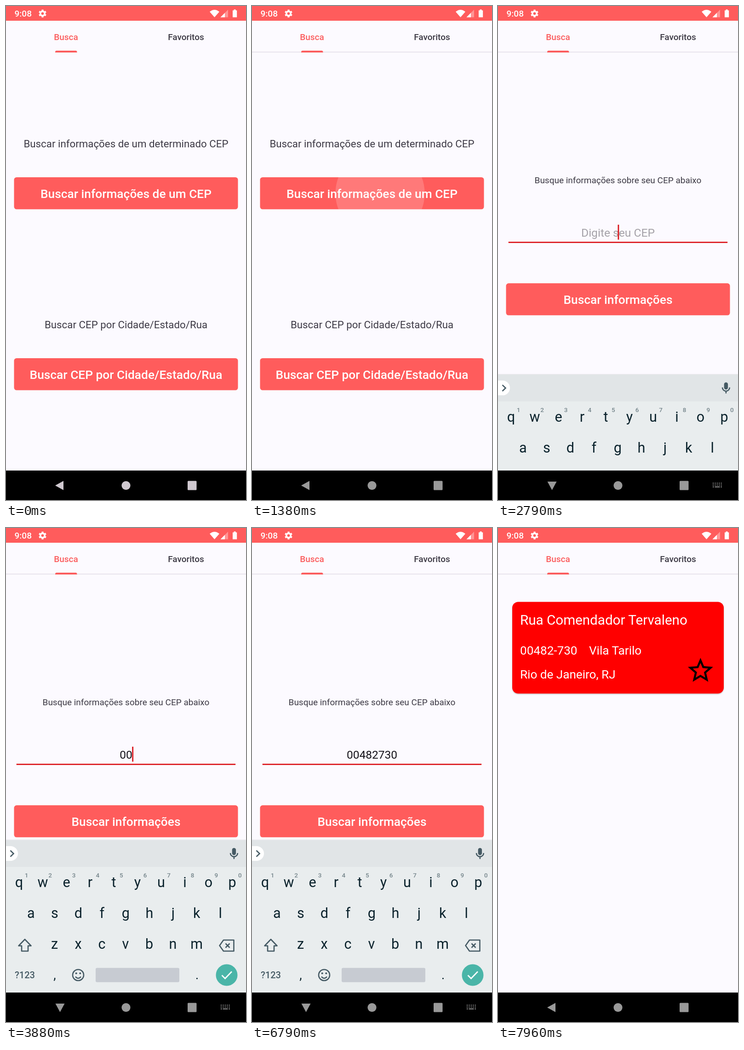
An HTML page for the animation above (8 s loop, 522 by 1073 pixels).

```html
<!DOCTYPE html>
<html lang="pt-BR">
<head>
<meta charset="utf-8">
<title>Busca de CEP</title>
<style>
  html, body { margin: 0; width: 100%; height: 100%; overflow: hidden; background: #fcfaff; }
  svg { display: block; width: 100vw; height: 100vh; font-family: Roboto, sans-serif; fill: #3d3a45; }
  .mid { text-anchor: middle; }
  .bold { font-weight: 500; }
  .line { fill: none; stroke: #455a64; stroke-width: 2.6; }
</style>
</head>
<body>
<svg id="stage" viewBox="0 0 522 1073">
  <defs>
    <clipPath id="content"><rect y="101" width="522" height="908"/></clipPath>
    <clipPath id="above"><rect width="522" height="1009"/></clipPath>
    <clipPath id="homeButton"><rect x="17.5" y="372" width="487" height="69.5" rx="5.5"/></clipPath>
    <clipPath id="formButton"><rect x="17.5" y="602.3" width="487" height="69.5" rx="5.5"/></clipPath>
    <filter id="shadow" x="-5%" y="-5%" width="110%" height="115%">
      <feDropShadow dx="0" dy="1.2" stdDeviation="1.3" flood-opacity=".3"/>
    </filter>
  </defs>

  <rect width="522" height="1073" fill="#fcfaff"/>
  <rect id="rule" y="99.3" width="522" height="1.5" fill="#e3dde6"/>
  <g class="mid bold" font-size="19">
    <text x="130.5" y="74.3" fill="#fb5d5e">Busca</text>
    <text x="391.5" y="74.3">Favoritos</text>
  </g>
  <path d="M107 101v-1q0-3 3-3h41.500q3 0 3 3v1z" fill="#fb5d5e"/>

  <g fill="#fff">
    <rect width="522" height="32" fill="#ff5c5c"/>
    <text x="18.500" y="23.300" font-size="19" class="bold">9:08</text>
    <g fill="none" stroke="#fff">
      <circle cx="79.500" cy="16.300" r="4.700" stroke-width="3.600"/>
      <circle cx="79.500" cy="16.300" r="7" stroke-width="3" pathLength="6" stroke-dasharray=".52 .48" stroke-dashoffset=".26" transform="rotate(30 79.500 16.300)"/>
    </g>
    <path d="M443 12.500Q453.500 4 464 12.500L453.500 24.500z"/>
    <path d="M466.500 24.500L483 8v16.500z" opacity=".35"/>
    <path d="M466.500 24.500L476 15v9.500z"/>
    <path d="M493 9.500h2.600v-2h4v2h2.600v15h-9.200z"/>
  </g>

  <g clip-path="url(#content)">
    <g id="home"></g>
    <g id="form"></g>
    <g id="result">
      <rect y="101" width="522" height="908" fill="#fcfaff"/>
      <rect x="31" y="160.500" width="460" height="199" rx="13" fill="#f00" filter="url(#shadow)"/>
      <g fill="#fff" font-size="26.100">
        <text x="48" y="209.500" font-size="29.600">Rua Comendador Tervaleno</text>
        <text x="48" y="275">00482-730</text>
        <text x="198" y="275">Vila Tarilo</text>
        <text x="48" y="327">Rio de Janeiro, RJ</text>
      </g>
      <path transform="translate(407.500 276.500) scale(2.740)" fill="#000" d="M22 9.240l-7.190-.620L12 2 9.190 8.630 2 9.240l5.460 4.730L5.820 21 12 17.270 18.180 21l-1.630-7.030zM12 15.400l-3.760 2.270 1-4.280-3.320-2.880 4.380-.380L12 6.100l1.710 4.040 4.380.380-3.320 2.880 1 4.280z"/>
    </g>
  </g>

  <g clip-path="url(#above)"><g id="keyboard"></g></g>

  <rect y="1009" width="522" height="64"/>
  <rect y="1009" width="522" height="64" fill="#000"/>
  <g id="nav">
    <path id="back" d="M107 1041.500L125 1031.500V1051.500z" stroke-linejoin="round" stroke-width="1"/>
    <path id="down" d="M107.500 1033H127.500L117.500 1051.500z"/>
    <circle cx="261" cy="1041.500" r="9.600"/>
    <rect x="395" y="1031.500" width="19.500" height="20" rx="1.500"/>
    <g id="switcher" fill="none" stroke="#999" stroke-width="2">
      <path d="M467 1036.500h20M467 1040.500h20" stroke-dasharray="2 2.400"/>
      <path d="M467 1044.500h2.500m2 0h11m2 0h2.500"/>
    </g>
  </g>
</svg>
<script>
const LOOP = 8000, CODE = '00482730';
const FOCUS = 2620, KEYS_IN = 2720, KEYS_OUT = 7450, TYPE_START = 3400, TYPE_STEP = 370;
const $ = id => document.getElementById(id);
const clamp = x => Math.max(0, Math.min(1, x));
const ease = x => 1 - (1 - clamp(x)) ** 3;
const show = (id, on) => $(id).setAttribute('visibility', on ? 'visible' : 'hidden');
const set = (id, attrs) => {
  for (const k in attrs) $(id).setAttribute(k, attrs[k]);
};

const label = (text, x, y, size, extra = '') =>
  `<text class="mid" x="${x}" y="${y}" font-size="${size}" ${extra}>${text}</text>`;
const button = (text, y, ripple = '') =>
  `<rect x="17.5" y="${y}" width="487" height="69.5" rx="5.5" fill="#ff5c5c"/>${ripple}` +
  label(text, 261, y + 45, 26.3, 'font-weight="500" style="fill:#fff"');
const ripple = id => `<g clip-path="url(#${id}Button)"><circle id="${id}Ripple" fill="#fff"/></g>`;
const page = '<rect y="101" width="522" height="908" fill="#fcfaff"/>';

$('home').innerHTML = page +
  label('Buscar informações de um determinado CEP', 261, 307, 22.3) +
  button('Buscar informações de um CEP', 372, ripple('home')) +
  label('Buscar CEP por Cidade/Estado/Rua', 261, 700, 22.3) +
  button('Buscar CEP por Cidade/Estado/Rua', 765);

$('form').innerHTML = page +
  label('Busque informações sobre seu CEP abaixo', 261, 385.3, 19) +
  label('Digite seu CEP', 261, 501, 24.6, 'id="hint" fill="#a5a2a8"') +
  label('', 261, 501, 24.5, 'id="typed" fill="#15131a"') +
  '<rect id="underline" x="22.7" width="476.5"/>' +
  '<rect id="caret" y="475" width="2.8" height="32.5" fill="#d9161c"/>' +
  button('Buscar informações', 602.3, ripple('form'));

const row = (keys, x, y) => [...keys].map((k, i) => label(k, x + i * 51.5, y, 30.5)).join('');
$('keyboard').innerHTML = `
  <rect y="678" width="522" height="331" fill="#e9edee"/>
  <rect y="678" width="522" height="58" fill="#e1e5e7"/>
  <rect y="676.5" width="522" height="1.5" fill="#000" opacity=".06"/>
  <path d="M0 691h10a16 16 0 0 1 0 32H0z" fill="#fff"/>
  <path d="M9.500 700.500l7 6.700-7 6.700" class="line"/>
  <rect x="491.700" y="695" width="8.400" height="15.500" rx="4.200" fill="#455a64"/>
  <path d="M488 706a7.900 7.900 0 0 0 15.800 0M495.900 714v5" class="line" stroke-width="2"/>
  <g fill="#0a222c">
    ${row('qwertyuiop', 28.5, 780)}${row('asdfghjkl', 54.3, 847)}${row('zxcvbnm', 105.5, 914)}
    ${label(',', 106, 980, 27)}${label('.', 415.5, 980, 27)}
  </g>
  <g fill="#75858b" font-weight="500">
    ${[...'1234567890'].map((d, i) => label(d, 44.5 + i * 51.6, 759.3, 13.5)).join('')}
  </g>
  ${label('?123', 41, 978, 20, 'fill="#455a64" font-weight="500"')}
  <g class="line">
    <path d="M41 893.500L27.500 907.500h6.500v11.500h14v-11.500h6.500z" stroke-linejoin="round"/>
    <path d="M464.500 907l8.500-12h22.500v24h-22.500zM477.500 902.500l9 9m0-9l-9 9" stroke-linejoin="round"/>
    <circle cx="157" cy="971" r="12"/>
    <path d="M151 974.500q6 7 12 0"/>
  </g>
  <g fill="#455a64"><circle cx="152.700" cy="967.300" r="2"/><circle cx="161.300" cy="967.300" r="2"/></g>
  <rect x="195" y="955.500" width="182" height="31" rx="3" fill="#c7cbd2"/>
  <circle cx="480" cy="971" r="23.500" fill="#4ab5a8"/>
  <path d="M469.500 971.500l7 7 14.500-15" fill="none" stroke="#fff" stroke-width="2.700"/>`;

// Touch wave that grows while drifting to the button's centre, then fades.
function drawRipple(id, t, start, touchX, cy) {
  const age = t - start, grow = 1 - (1 - clamp(age / 320)) ** 2;
  set(id + 'Ripple', {
    cx: touchX + (261 - touchX) * grow, cy, r: 246 * grow,
    opacity: age < 0 ? 0 : 0.18 * clamp(age / 60) * (1 - clamp((age - 270) / 180))
  });
}

function enterPage(id, t, start) {
  const p = ease((t - start) / 200);
  show(id, t >= start);
  set(id, { opacity: p, transform: `translate(0 ${60 * (1 - p)})` });
}

function draw(t) {
  const first = t < 40;
  show('rule', !first);
  set('nav', { fill: first ? '#d0c9d0' : '#999' });

  drawRipple('home', t, 1310, 290, 406.7);
  enterPage('form', t, 1600);
  drawRipple('form', t, 7200, 280, 637);
  enterPage('result', t, 7520);

  const focused = t >= FOCUS;
  const count = Math.max(0, Math.min(CODE.length, Math.floor((t - TYPE_START) / TYPE_STEP) + 1));
  const lastEdit = count ? TYPE_START + (count - 1) * TYPE_STEP : FOCUS;
  const typed = $('typed');
  typed.textContent = CODE.slice(0, count);
  $('hint').setAttribute('opacity', count ? 0 : 1);
  $('caret').setAttribute('opacity', focused && (t - lastEdit) % 1000 < 500 ? 1 : 0);
  set('caret', { x: 260.5 + (count ? typed.getComputedTextLength() / 2 : 0) });
  set('underline', focused
    ? { y: 512, height: 2.7, fill: '#dc171c' }
    : { y: 512.2, height: 1.4, fill: '#56515a' });

  const up = ease((t - KEYS_IN) / 250) - clamp((t - KEYS_OUT) / 200) ** 2;
  set('keyboard', { transform: `translate(0 ${334 * (1 - up)})` });
  show('keyboard', up > 0);
  const open = t >= KEYS_IN && t < KEYS_OUT;
  show('back', !open);
  show('down', open);
  show('switcher', open);
}

const begin = performance.now();
function tick() {
  draw((performance.now() - begin) % LOOP);
  requestAnimationFrame(tick);
}
tick();
</script>
</body>
</html>
```
